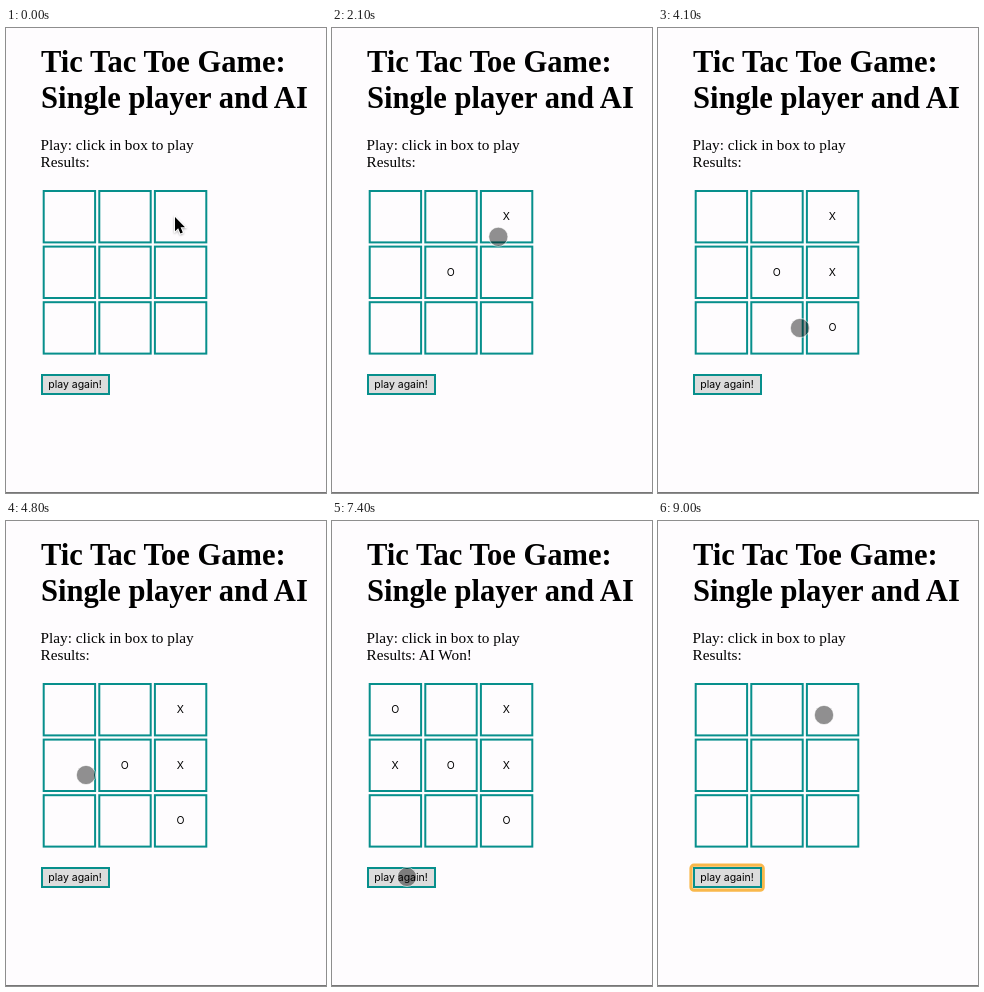
Write an HTML page that moves like this. It is 320 by 465 pixels and loops after 9100 ms.

```html
<!DOCTYPE html>
<html lang="en">
<head>
<meta charset="utf-8">
<title>Tic Tac Toe</title>
<style>
  html, body { margin: 0; width: 100%; height: 100%; overflow: hidden; background: #fefcfe; }
  svg { display: block; width: 320px; height: 465px; }
  text { white-space: pre; }
  .title { font: bold 30.55px "Liberation Serif", Times, serif; }
  .body { font: 15.28px "Liberation Serif", Times, serif; }
  .ui { font: 10.5px Inter, Roboto, sans-serif; text-anchor: middle; }
  .box { fill: none; stroke: #078f8c; stroke-width: 2; }
</style>
</head>
<body>
<svg viewBox="0 0 320 465">
  <defs>
    <filter id="soft" x="-20%" y="-40%" width="140%" height="180%">
      <feGaussianBlur stdDeviation="0.7"/>
    </filter>
    <filter id="shade" x="-60%" y="-40%" width="220%" height="200%">
      <feDropShadow dx="0" dy="1" stdDeviation="1" flood-opacity="0.35"/>
    </filter>
  </defs>
  <rect width="320" height="465" fill="#fefcfe"/>
  <rect y="464" width="320" height="1" fill="#777"/>

  <text class="title" x="35" y="44">Tic Tac Toe Game:</text>
  <text class="title" x="35" y="80">Single player and AI</text>
  <text class="body" x="34.5" y="122">Play: click in box to play</text>
  <text class="body" x="34.5" y="139">Results: <tspan id="result"></tspan></text>

  <g id="board"></g>

  <rect id="ring" x="33" y="344.2" width="72.2" height="25" rx="3" fill="none"
        stroke="#f9b84b" stroke-width="3.2" filter="url(#soft)"/>
  <rect class="box" x="36" y="347" width="67" height="19" style="fill:#dcdcdc"/>
  <text class="ui" x="69" y="360">play again!</text>

  <path id="arrow" d="M0 0V14.2L3.2 11.2L5.4 16.4L7.8 15.4L5.6 10.3H10Z"
        stroke="#fff" stroke-width="1.6" paint-order="stroke" filter="url(#shade)"/>
  <circle id="dot" r="9.6" fill="#000" fill-opacity="0.43"
          stroke="#fff" stroke-opacity="0.6" stroke-width="1"/>
</svg>
<script>
const LOOP = 9100, STEP = 100;
const PRESS = 500, WIN = 5400, RESET = 7700;

// time, x, y of the pointer
const path = [
  [0, 169, 189], [500, 170, 191], [1000, 166, 201], [2000, 166, 201],
  [2600, 168, 248], [3600, 168, 248], [4000, 154, 289], [4100, 142, 300],
  [4700, 80, 254], [6300, 80, 254], [7000, 76, 350], [7300, 75, 356],
  [8000, 75, 356], [8700, 166, 194], [9100, 166, 194]
];

// time, cell, mark
const moves = [
  [1700, 2, "X"], [1700, 4, "O"],
  [3300, 5, "X"], [3300, 8, "O"],
  [WIN, 3, "X"], [WIN, 0, "O"]
];

const get = id => document.getElementById(id);
const make = (tag, attrs) => {
  const el = document.createElementNS("http://www.w3.org/2000/svg", tag);
  for (const key in attrs) el.setAttribute(key, attrs[key]);
  return get("board").appendChild(el);
};
const show = (el, on) => { el.style.display = on ? "" : "none"; };

const cells = Array.from({ length: 9 }, (_, i) => {
  const x = 63.4 + 55.6 * (i % 3), y = 188.7 + 55.6 * Math.floor(i / 3);
  make("rect", { class: "box", x: x - 25.7, y: y - 25.7, width: 51.4, height: 51.4 });
  return make("text", { class: "ui", x: x - 0.2, y: y + 3.5 });
});

const arrow = get("arrow"), dot = get("dot"), ring = get("ring"), result = get("result");

function pointAt(t) {
  const i = path.findIndex(p => p[0] > t);
  const [t0, x0, y0] = path[i - 1], [t1, x1, y1] = path[i];
  const k = (t - t0) / (t1 - t0);
  const mix = (a, b) => a + (b - a) * k;
  return [mix(x0, x1), mix(y0, y1)];
}

function draw(t) {
  const place = `translate(${pointAt(t)})`;
  arrow.setAttribute("transform", place);
  dot.setAttribute("transform", place);
  show(arrow, t < PRESS);
  show(dot, t >= PRESS);
  show(ring, t >= RESET);
  result.textContent = t >= WIN && t < RESET ? "AI Won!" : "";
  for (const [start, cell, mark] of moves) {
    cells[cell].textContent = t >= start && t < RESET ? mark : "";
  }
}

const origin = performance.now();
function tick() {
  const t = (performance.now() - origin) % LOOP;
  draw(Math.floor(t / STEP) * STEP);
  requestAnimationFrame(tick);
}
tick();
</script>
</body>
</html>
```
